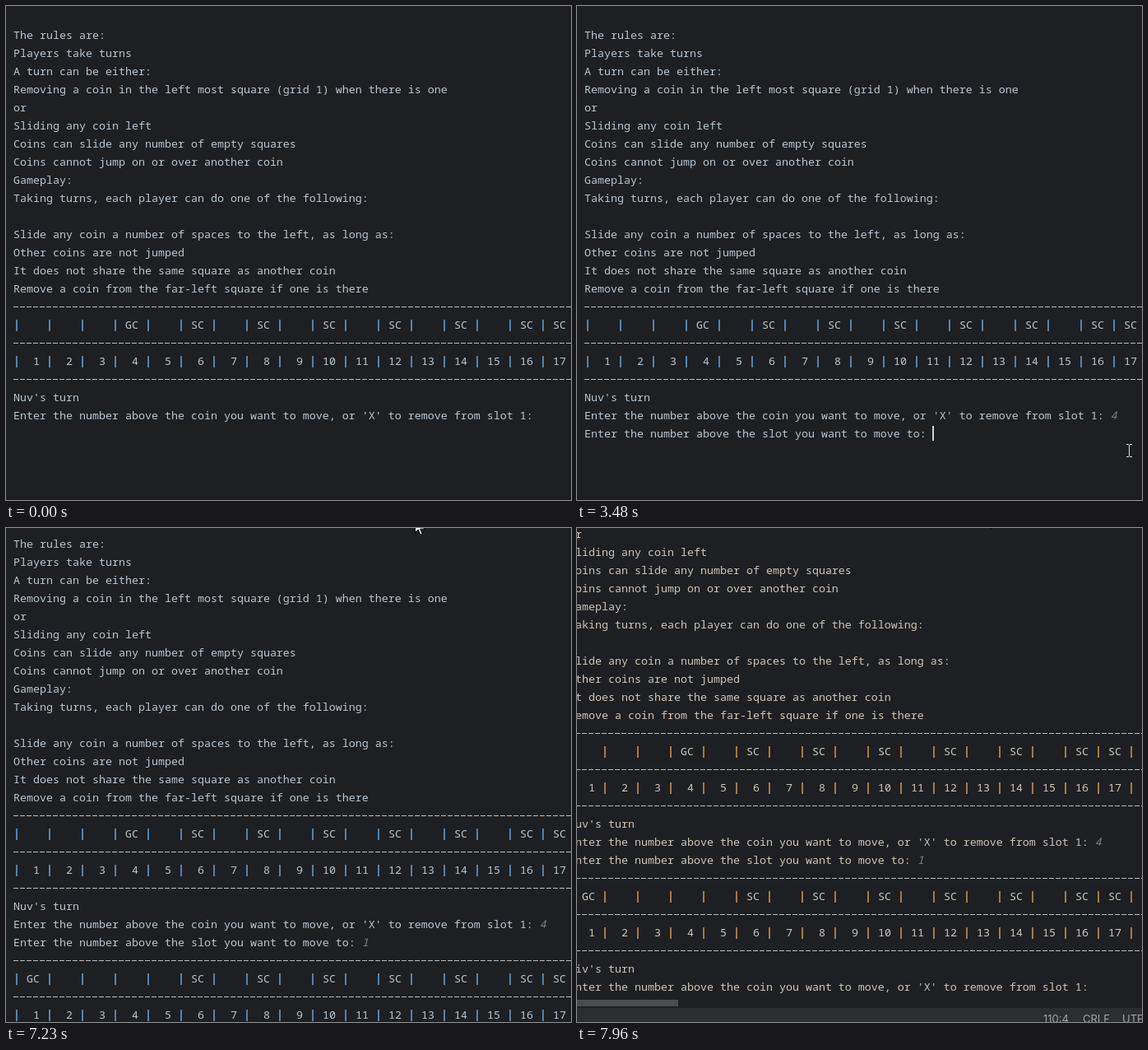
Write an HTML page that moves like this. It is 687 px wide and 600 px high and loops after 8000 ms.

```html
<!DOCTYPE html>
<html lang="en">
<head>
<meta charset="utf-8">
<title>Coin game</title>
<style>
  html, body { margin: 0; width: 100%; height: 100%; overflow: hidden; background: #1e1f22; }
  #stage { position: relative; width: 687px; height: 600px; overflow: hidden; background: #1e1f22;
    --text: #b9c6d2; --bar: #6aa5da; }
  #stage.warm { --text: #cfc5b9; --bar: #cc9a5e; }
  #world, #term, #world > div, #bar > *, #caret, svg { position: absolute; }
  #world { left: 0; top: 0; }
  #term { left: 9px; top: 24px; font: 500 13.333px/22px "Noto Sans Mono", monospace; color: var(--text); }
  #term > div { height: 22px; width: 820px; white-space: pre; }
  #term b { font-weight: 600; color: var(--bar); }
  #term i { font-weight: 400; color: #7d8186; }
  .rule { background: repeating-linear-gradient(90deg, #b9bbc0 0 6px, transparent 6px 8px) 0 11px / 808px 1px no-repeat; }
  #caret { width: 2px; height: 18px; margin-left: -1px; background: #ced0d6; }
  #scroll { left: 9px; top: 673px; width: 133px; height: 8px; background: #4b4c4f; }
  #status { left: -30px; top: 683px; width: 800px; height: 29px; background: #2b2d30; }
  #status span { position: absolute; font: 13px/27px Inter, sans-serif; color: #a0a3aa; }
  #bar { left: -30px; top: 712px; width: 800px; height: 48px; background: #ddd; box-shadow: inset 0 1px #c9c9c9; }
  #bar span { left: 686px; top: 9px; width: 40px; font: 12px/16px "Open Sans", sans-serif; color: #1b1b1b; text-align: center; }
  svg { left: 0; top: 0; overflow: visible; }
</style>
</head>
<body>
<div id="stage">
  <div id="world">
    <div id="term"></div>
    <div id="scroll"></div>
    <div id="status"></div>
    <div id="bar"></div>
  </div>
  <svg id="beam" width="7" height="16" fill="none" stroke="#dcdcdc">
    <path d="M0 .5H3M4 .5H7M0 15.5H3M4 15.5H7M3.5 1V15"/>
  </svg>
  <svg id="arrow" width="13" height="20">
    <path d="M.5 .5V16.5L4.2 13L6.7 19L9.2 18L6.7 12.2H12Z" fill="#fff" stroke="#000"/>
  </svg>
</div>
<script>
const $ = id => document.getElementById(id);
const LOOP = 8000, STEP = 66.9, COLS = 20;
const TYPE_COIN = 3350, ENTER_COIN = 3480, TYPE_SLOT = 4420, ENTER_SLOT = 4490;
const ARROW = 7020, PAN = 7230;
const stage = $('stage'), term = $('term'), world = $('world'), caret = $('caret');

// Terminal text
const row = cell => Array.from({ length: COLS }, (_, i) => '| ' + cell(i + 1).padStart(2) + ' ').join('') + '|';
const silver = n => n === 17 || (n >= 6 && n <= 16 && n % 2 === 0);
const board = gold => ['-', row(n => n === gold ? 'GC' : silver(n) ? 'SC' : ''), '-', row(String), '-'];
const askCoin = "Enter the number above the coin you want to move, or 'X' to remove from slot 1: ";
const askSlot = 'Enter the number above the slot you want to move to: ';
const rules = `The rules are:
Players take turns
A turn can be either:
Removing a coin in the left most square (grid 1) when there is one
or
Sliding any coin left
Coins can slide any number of empty squares
Coins cannot jump on or over another coin
Gameplay:
Taking turns, each player can do one of the following:

Slide any coin a number of spaces to the left, as long as:
Other coins are not jumped
It does not share the same square as another coin
Remove a coin from the far-left square if one is there`.split('\n');
const before = [...rules, ...board(4), "Nuv's turn", askCoin + '<i>4</i>'];
const SLOT = before.length;
const lines = [...before, askSlot + '<i>1</i>', ...board(1), "Niv's turn", askCoin];
term.insertAdjacentHTML('beforeend', lines.map(s => s === '-'
  ? '<div class="rule"></div>'
  : `<div>${s.replace(/\|/g, '<b>|</b>')}</div>`).join('') + '<span id="caret"></span>');
const rows = [...term.children].slice(0, lines.length);
const [coinKey, slotKey] = term.querySelectorAll('i');
const cursor = term.lastChild;

// Status bar and taskbar
$('status').innerHTML = ['110:4', 'CRLF', 'UTF-8']
  .map((s, i) => `<span style="left:${616 + 48 * i}px">${s}</span>`).join('');
const box = (cx, cy, size, color, round = 0) =>
  `<div style="left:${cx - size / 2}px;top:${cy - size / 2}px;width:${size}px;height:${size}px;background:${color};border-radius:${round}px"></div>`;
const appX = i => 27 + 44 * i;
$('bar').innerHTML =
  box(appX(3), 25, 40, '#f1f0f0', 4) +
  box(appX(4), 25, 40, '#ecaaa5', 4) +
  ['#2f6f9c', '#6b4ea0', '#201d20', '#8a2a22', '#23a030']
    .map((c, i) => box(appX(i), 22, 20, c, i % 2 ? 10 : 0)).join('') +
  box(668, 24, 15, '#2479be', 8) +
  '<svg style="left:632px;top:21px" width="11" height="7" fill="none" stroke="#222" stroke-width="1.5"><path d="M.5 6L5.5 1L10.5 6"/></svg>' +
  '<span>ENG<br>US</span>';

// Each move: begin, end, x, y, then an optional sideways bow
const beamMoves = [
  [130, 730, 140, 386, 0, -117],
  [870, 1070, 149, 388, 36, -6],
  [1210, 2010, 656, 501, 220, 0],
  [2070, 2140, 661, 539],
  [2410, 2465, 671, 540],
  [5550, 5615, 624, 21],
  [5820, 6085, 512, 4],
  [6290, 7090, 500, 4, 18, 132]
];
const arrowMoves = [[PAN, 7690, 497, -18]];
const panMoves = [[PAN, 7425, -7, -136], [7430, 7690, -21, -142], [7695, 7955, -19, -100]];

function follow(x, y, moves, t) {
  for (const [begin, end, toX, toY, bowX = 0, bowY = 0] of moves) {
    if (t < begin) break;
    const k = Math.min(1, (t - begin) / (end - begin)), bow = Math.sin(Math.PI * k);
    x += (toX - x) * k + bowX * bow;
    y += (toY - y) * k + bowY * bow;
  }
  return [Math.round(x), Math.round(y)];
}
const move = (el, [x, y]) => { el.style.transform = `translate(${x}px,${y}px)`; };
const show = (el, on) => { el.style.visibility = on ? 'visible' : 'hidden'; };
const within = (t, a, b) => t >= a && t < b;

function draw(t) {
  const s = Math.floor((t + 4) / STEP) * STEP + 2;

  rows.forEach((r, i) => show(r, i < SLOT || t >= (i === SLOT ? ENTER_COIN : ENTER_SLOT)));
  show(coinKey, t >= TYPE_COIN);
  show(slotKey, t >= TYPE_SLOT);
  move(term, [0, t >= ENTER_SLOT ? -16 : 0]);

  const onSlot = t >= ENTER_COIN;
  const col = onSlot ? askSlot.length + (t >= TYPE_SLOT) : askCoin.length + (t >= TYPE_COIN);
  cursor.style.left = col * 8 + 'px';
  cursor.style.top = (onSlot ? SLOT : SLOT - 1) * 22 + 2 + 'px';
  show(cursor, within(t, 2410, 2470) || within(t, 3010, 4020) || within(t, TYPE_SLOT, ENTER_SLOT));

  const [bx, by] = follow(590, 575, beamMoves, s);
  move($('beam'), [bx - 3, by - 8]);
  show($('beam'), within(t, 130, ARROW));
  move($('arrow'), follow(497, -11, arrowMoves, s));
  show($('arrow'), t >= ARROW);

  move(world, follow(0, 0, panMoves, s));
  stage.classList.toggle('warm', t >= PAN + 60);
}

const start = performance.now();
function tick() {
  draw((performance.now() - start) % LOOP);
  requestAnimationFrame(tick);
}
tick();
</script>
</body>
</html>
```
